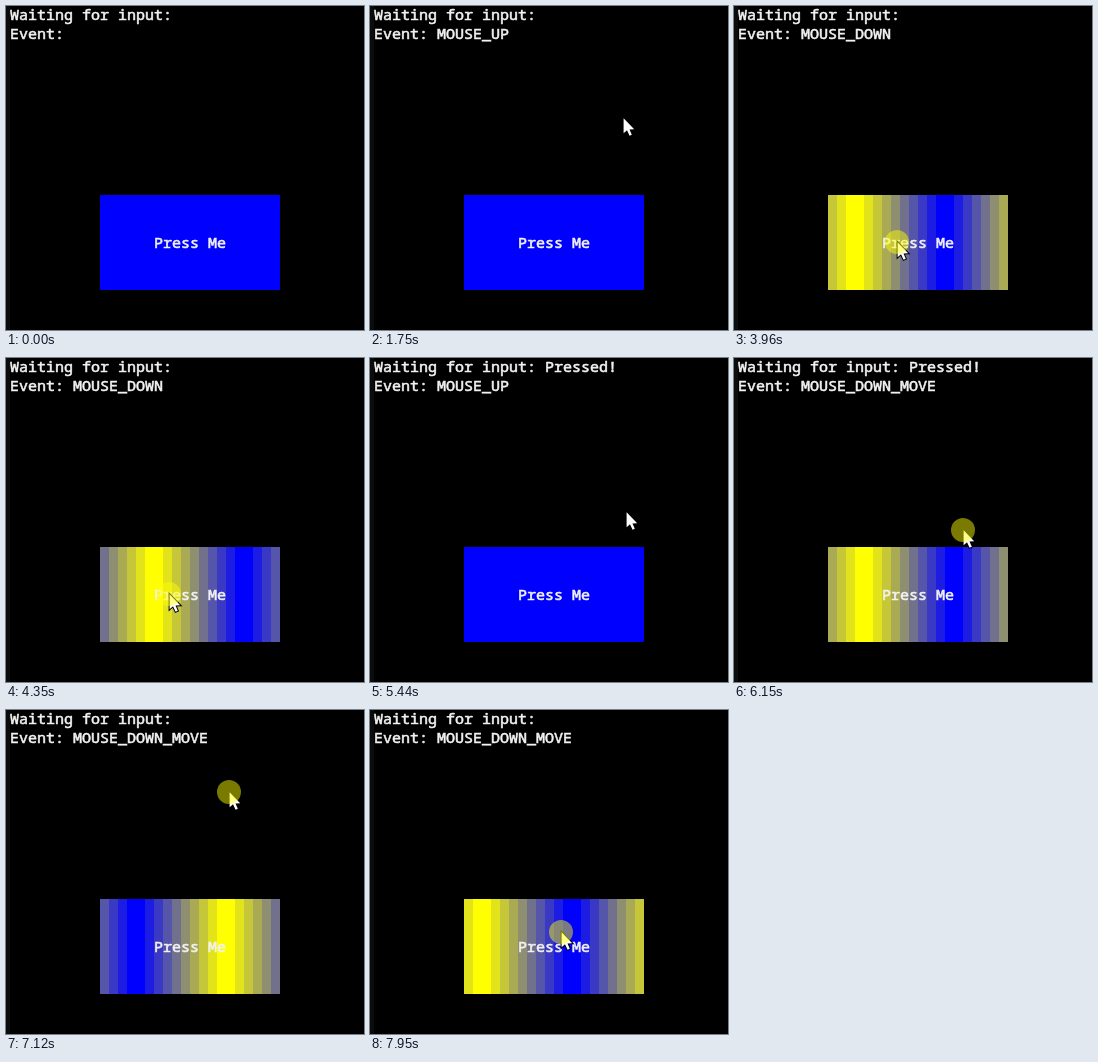
Write an HTML page with a canvas that moves like this. It is 358 px wide and 324 px high and loops after 8 s.

```html
<!DOCTYPE html>
<html lang="en">
<head>
<meta charset="utf-8">
<title>Terminal button</title>
<style>
html, body { margin: 0; width: 100%; height: 100%; overflow: hidden; background: #000; }
canvas { display: block; width: 358px; height: 324px; }
</style>
</head>
<body>
<canvas id="stage" width="358" height="324"></canvas>
<script>
const ctx = document.getElementById('stage').getContext('2d');
const LOOP = 8000, CELL = 9, COLS = 20, STEP = 101.5;
const button = { x: 94, y: 189, w: 180, h: 95 };

// Pointer strokes: each bends past `via` to reach `to`; ease > 1 slows the end
const entry = [306, 324];
const moves = [
  { start: 310, end: 1110, via: [181, 262], to: [313, 200], ease: 1.3 },
  { start: 1630, end: 1960, via: [277, 148], to: [242, 95], ease: 4 },
  { start: 2320, end: 3120, via: [-90, 150], to: [39, 284] },
  { start: 3170, end: 3640, via: [115, 315], to: [163, 236] },
  { start: 4850, end: 5440, via: [360, 244], to: [256, 154] },
  { start: 5440, end: 5630, via: [240, 170], to: [230, 208] },
  { start: 5980, end: 6540, via: [230, 150], to: [223, 82] },
  { start: 7370, end: 7950, via: [215, 140], to: [191, 222] }
];

// Spans with the mouse button down
const holds = [
  { from: 1180, to: 1630 },
  { from: 2320, to: 3170 },
  { from: 3820, to: 4470, onButton: true },
  { from: 5700, to: LOOP, onButton: true }
];
const pressed = { from: 4470, to: 6540 };

const within = (t, span) => t >= span.from && t < span.to;

function pointer(t) {
  let pos = entry;
  for (const { start, end, via, to, ease = 1 } of moves) {
    if (t < start) break;
    const v = (1 - Math.min(1, (t - start) / (end - start))) ** ease, u = 1 - v;
    pos = pos.map((p, i) => p * v * v + 2 * u * v * via[i] + to[i] * u * u);
  }
  return pos.map(Math.round);
}

function eventName(t) {
  const hold = holds.filter(h => t >= h.from).pop();
  if (!hold) return '';
  if (t >= hold.to) return 'MOUSE_UP';
  const dragged = moves.some(m => m.start >= hold.from && t > m.start);
  return dragged ? 'MOUSE_DOWN_MOVE' : 'MOUSE_DOWN';
}

function drawText(text, x, baseline) {
  ctx.fillStyle = ctx.strokeStyle = '#f2f2f2';
  ctx.lineWidth = 0.6;
  ctx.fillText(text, x, baseline);
  ctx.strokeText(text, x, baseline);
}

function drawButton(t, active) {
  const { x, y, w, h } = button;
  ctx.fillStyle = '#00f';
  ctx.fillRect(x, y, w, h);
  if (active) {
    const shift = Math.floor((t - 3747) / STEP) + 1;
    for (let c = 0; c < COLS; c++) {
      const k = (c - shift + 3 * COLS) % COLS;
      const level = k < 10 ? 1 - k / 9 : (k - 10) / 9;
      const v = Math.round(255 * level);
      ctx.fillStyle = `rgb(${v},${v},${255 - v})`;
      ctx.fillRect(x + c * CELL, y, CELL, h);
    }
  }
  drawText('Press Me', 148, 242);
}

const arrow = new Path2D('M1 1V16L4.4 13 7 18.5 9.2 17.5 6.9 12.2 11.6 12Z');

function drawPointer([x, y], held) {
  ctx.save();
  ctx.translate(x - 0.4, y - 0.7);
  ctx.lineWidth = 2;
  ctx.strokeStyle = '#000';
  ctx.stroke(arrow);
  ctx.fillStyle = '#fff';
  ctx.fill(arrow);
  ctx.restore();
  if (!held) return;
  ctx.fillStyle = 'rgba(255,255,0,.48)';
  ctx.beginPath();
  ctx.arc(x, y, 12, 0, Math.PI * 2);
  ctx.fill();
}

function draw(t) {
  ctx.fillStyle = '#000';
  ctx.fillRect(0, 0, 358, 324);
  ctx.fillStyle = '#0c0c0c';
  ctx.fillRect(0, 0, 4, 324);
  ctx.font = '15px "Noto Sans Mono", "DejaVu Sans Mono", monospace';

  const hold = holds.find(h => within(t, h));
  drawText('Waiting for input:' + (within(t, pressed) ? ' Pressed!' : ''), 4, 14);
  drawText('Event: ' + eventName(t), 4, 33);
  drawButton(t, hold && hold.onButton);
  if (t >= moves[0].start) drawPointer(pointer(t), hold);
}

const origin = performance.now();
function tick() {
  draw((performance.now() - origin) % LOOP);
  requestAnimationFrame(tick);
}
tick();
</script>
</body>
</html>
```
